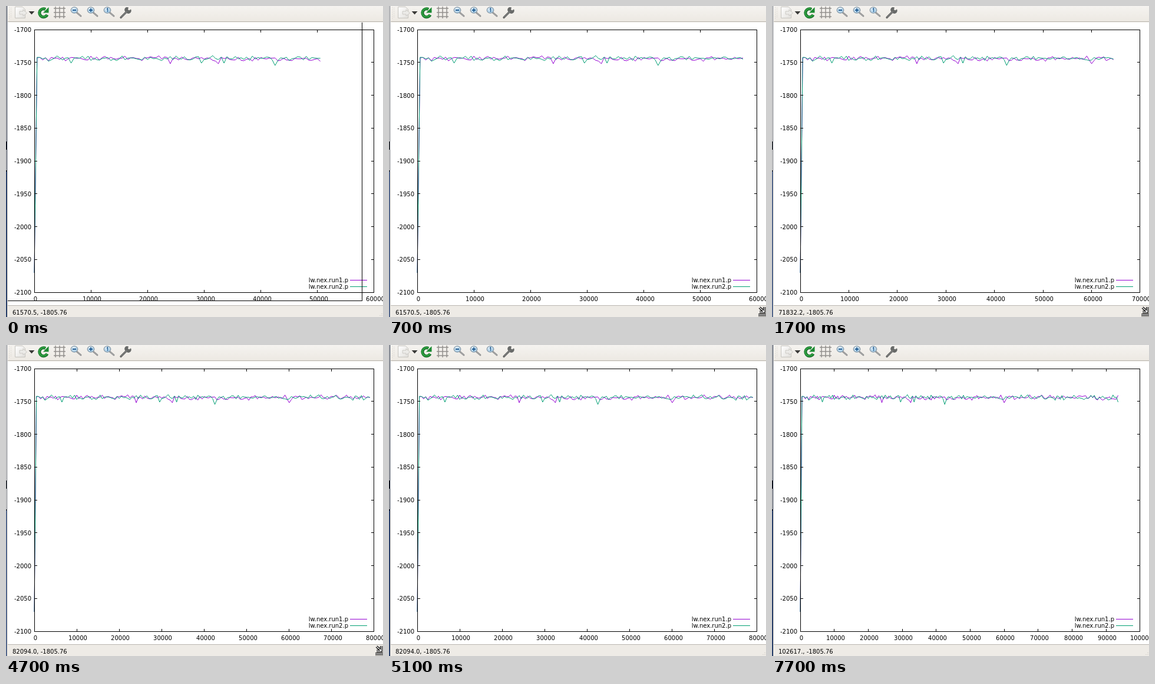
Animation of 640 by 528 pixels, one loop 8 s. Source, as an HTML page:

```html
<!DOCTYPE html>
<html lang="en">
<head>
<meta charset="utf-8">
<title>Trace plot</title>
<style>
  html, body { margin: 0; width: 100%; height: 100%; overflow: hidden; background: #fff; }
  svg { display: block; width: 640px; height: 528px; }
  text { font: 10px "DejaVu Sans", sans-serif; fill: #000; }
  .end { text-anchor: end; }
  .mid { text-anchor: middle; }
  .line { fill: none; stroke-width: 1; stroke-linejoin: round; }
  .crisp { shape-rendering: crispEdges; }
</style>
</head>
<body>
<svg viewBox="0 0 640 528" xmlns="http://www.w3.org/2000/svg">
  <defs>
    <radialGradient id="lens" cx=".4" cy=".3" r=".8">
      <stop offset="0" stop-color="#e4f1fa"/><stop offset="1" stop-color="#8fbcdc"/>
    </radialGradient>
    <linearGradient id="paper" x2="1" y2="1">
      <stop offset="0" stop-color="#fff"/><stop offset="1" stop-color="#e2e0dc"/>
    </linearGradient>
    <linearGradient id="bar" x2="0" y2="1">
      <stop offset="0" stop-color="#f5f3f0"/><stop offset="1" stop-color="#ece8e2"/>
    </linearGradient>
    <g id="zoom">
      <path d="M4.500 4.500L11 10" stroke="#828384" stroke-width="2.800" stroke-linecap="round"/>
      <path d="M5 5L11 10" stroke="#c5c6c6" stroke-linecap="round"/>
      <ellipse rx="5.800" ry="5.200" fill="url(#lens)" stroke="#8b9aa6" stroke-width="1.200"/>
    </g>
    <g id="resize">
      <path d="M629 512L637 519M637 511V519.500H629"/>
      <path d="M627 524.500H640"/>
    </g>
  </defs>

  <rect width="640" height="528" fill="#fff"/>
  <g class="crisp">
    <rect width="640" height="28" fill="url(#bar)"/>
    <rect y="26" width="640" height="1" fill="#b7b3ac"/>
    <rect y="27" width="640" height="1" fill="#f4f2ee"/>
    <rect y="508" width="640" height="20" fill="#eeebe6"/>
    <rect y="508" width="640" height="1" fill="#bab6b0"/>
    <rect width="1" height="279" fill="#e8e3dc"/>
    <rect y="230" width="1" height="14" fill="#000"/>
    <rect y="279" width="1" height="249" fill="#36548c"/>
    <rect y="279" width="1" height="2" fill="#000"/>
    <rect id="edge" x="1" width="1" height="528"/>
    <rect x="2" width="1" height="528" fill="#f3f1ed"/>
  </g>

  <!-- toolbar -->
  <path d="M5.500 2V21M8.500 3V21" stroke="#d2cdc6" stroke-dasharray="1 2"/>
  <path d="M15.500 1.500H28L32.500 6V20.500H15.500Z" fill="url(#paper)" stroke="#c6c4bf"/>
  <path d="M23 9H29V6L35.500 12L29 17V14H23Z" fill="#ecebe8" stroke="#cccac5"/>
  <path d="M38.500 9H48.500L43.500 14.500Z" fill="#3a3a38"/>
  <g fill="none">
    <path d="M70 15A7 7 0 1 1 67 5.500" stroke="#126f27" stroke-width="5"/>
    <path d="M69.500 15A7 7 0 1 1 67 5.500" stroke="#2f9e40" stroke-width="2.600"/>
  </g>
  <path d="M72.500 2V11.500H63Z" fill="#1b8a32"/>
  <path d="M84 1V21M91 1V21M98 1V21M81 4H101M81 11H101M81 18H101" stroke="#92908d" stroke-width="1.500"/>
  <use href="#zoom" x="116" y="7"/>
  <use href="#zoom" x="144" y="7"/>
  <use href="#zoom" x="172" y="7"/>
  <path d="M113 7H119M141 7H147M144 4V10" stroke="#245f94" stroke-width="1.800"/>
  <path d="M171 5.500L172.500 4V10" fill="none" stroke="#245f94" stroke-width="1.300"/>
  <path d="M195 19.500L205 9.500" stroke="#5c5d5d" stroke-width="3.200" stroke-linecap="round"/>
  <path d="M203.500 10.500A4.500 4.500 0 0 1 208 2.500L207 6L209 7.500L212 5.500A4.500 4.500 0 0 1 203.500 10.500Z" fill="#686a69"/>
  <path d="M195 19.500L205 9.500" stroke="#a5a6a5"/>

  <!-- plot -->
  <path id="run1" class="line" stroke="#9400d3"/>
  <path id="run2" class="line" stroke="#009e73"/>
  <path id="axes" class="crisp" fill="none" stroke="#000"/>
  <g id="labels"></g>
  <text class="end" x="581" y="469">lw.nex.run1.p</text>
  <text class="end" x="581" y="480">lw.nex.run2.p</text>
  <path class="crisp" d="M584 465.500H613" stroke="#9400d3"/>
  <path class="crisp" d="M584 476.500H613" stroke="#009e73"/>
  <path id="crosshair" class="crisp" d="M604.500 28V501M3 500.500H605" stroke="#000"/>

  <!-- status bar -->
  <text id="status" x="11" y="524"></text>
  <path d="M638 522V527M635 525V527" stroke="#c5c1ba" stroke-dasharray="1 2"/>
  <rect id="tip" class="crisp" x="639" y="526" width="1" height="2" fill="#333"/>
  <g id="cursor" fill="none">
    <use href="#resize" stroke="#000" stroke-width="4"/>
    <use href="#resize" stroke="#fff" stroke-width="1.400"/>
  </g>
</svg>
<script>
const LOOP = 8000, FIRST_UPDATE = 200, INTERVAL = 1500;
const LEFT = 48, WIDTH = 576, SPAN = 577, TOP = 40, HEIGHT = 446;
const STEP = 500, TICK = 10000, SAMPLES = 188;
const $ = id => document.getElementById(id);

// Both runs start far down, then wander in a narrow band with a few dips
function makeSeries(seed, dips) {
  const random = () => (seed = seed * 16807 % 2147483647) / 2147483647;
  return Array.from({ length: SAMPLES }, (_, i) => {
    const wander = 83.5 + 5.5 * (random() + random());
    return i === 0 ? 453 : dips[i] ?? wander;
  });
}

const runs = {
  run1: makeSeries(1713, { 1: 88, 48: 98, 65: 98, 120: 98 }),
  run2: makeSeries(9241, { 1: 87, 13: 97, 59: 97, 67: 97, 85: 101, 187: 97 })
};
const label = (cls, x, y, value) => `<text class="${cls}" x="${x}" y="${y}">${value}</text>`;
const show = (id, visible) => $(id).setAttribute('visibility', visible ? 'visible' : 'hidden');

function drawPlot(max, last) {
  let axes = `M${LEFT + .5} ${TOP + .5}h${WIDTH}v${HEIGHT}h${-WIDTH}Z`;
  let labels = '';
  for (let i = 0; i <= 8; i++) {
    const y = TOP + i * HEIGHT / 8;
    axes += `M${LEFT} ${Math.floor(y) + .5}h5m${WIDTH - 9} 0h5`;
    labels += label('end', 43, Math.round(y) + 4, -1700 - i * 50);
  }
  for (let value = 0; value <= max; value += TICK) {
    const offset = value / max * SPAN;
    const x = Math.min(Math.floor(LEFT + offset), LEFT + WIDTH);
    axes += `M${x + .5} ${TOP}v5m0 ${HEIGHT - 9}v5`;
    labels += label('mid', Math.round(LEFT + 2 + offset), 501, value);
  }
  $('axes').setAttribute('d', axes);
  $('labels').innerHTML = labels;
  for (const id in runs) {
    const points = runs[id].slice(0, last + 1).map((y, i) =>
      `${(LEFT + i * STEP / max * SPAN).toFixed(2)} ${y.toFixed(2)}`);
    $(id).setAttribute('d', 'M' + points.join('L'));
  }
}

let current;
function render(time) {
  const t = time % LOOP;
  const update = Math.floor((t - FIRST_UPDATE) / INTERVAL) + 1;
  if (update !== current) {
    current = update;
    const last = Math.floor(101 + 14.4 * update);
    const max = Math.ceil(last * STEP / TICK) * TICK;
    const pointer = (61570.5 * max / 60000).toFixed(2).slice(0, 7);
    drawPlot(max, last);
    $('status').textContent = `${pointer}, -1805.76`;
  }
  show('crosshair', t < FIRST_UPDATE);
  show('tip', t >= 500 && t < 700);
  show('cursor', t >= 700 && t < 4900);
  $('edge').setAttribute('fill', t >= 700 && t < 5100 ? '#737b8a' : '#14233f');
}

const start = performance.now();
function frame() {
  render(performance.now() - start);
  requestAnimationFrame(frame);
}
frame();
</script>
</body>
</html>
```
